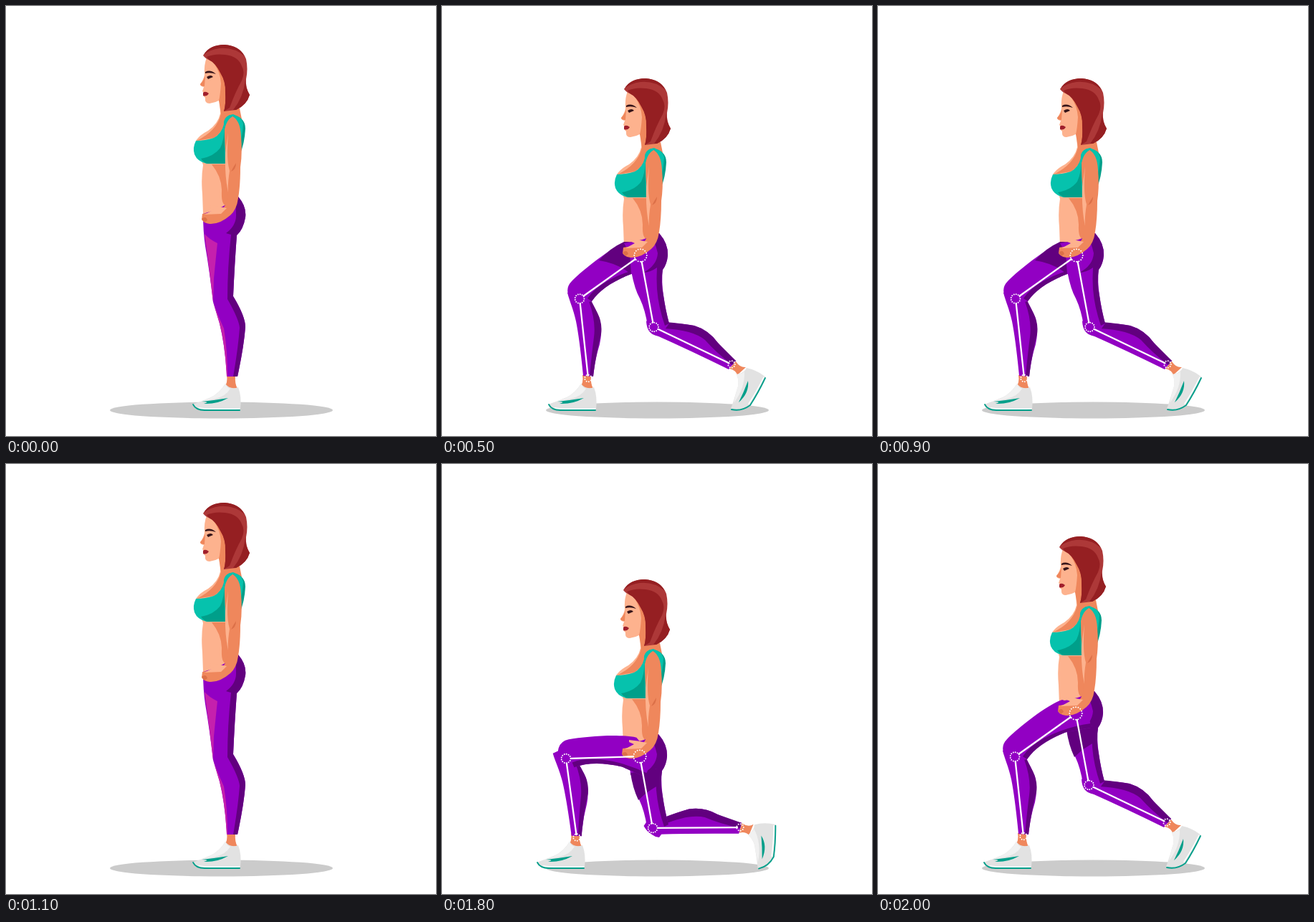
Recreate the animation shown at these times as an HTML page. Size 600 by 600 pixels, loop 2.2 s.

```html
<!DOCTYPE html>
<html lang="en">
<head>
<meta charset="utf-8">
<title>Lunges</title>
<style>
html, body { margin: 0; width: 100%; height: 100%; overflow: hidden; background: #fff }
svg { display: block; width: 600px; height: 600px }
</style>
</head>
<body>
<svg id="stage" viewBox="0 0 600 600"></svg>
<script>
const SKIN = '#fdb28e', TAN = '#ef875c', TAN2 = '#dc7048';
const HAIR = '#ad3838', HAIR2 = '#951f22';
const TEAL = '#06c2ad', TEAL2 = '#009f8a';
const PURPLE = '#9200c3', PLUM = '#62007f', PINK = '#c520ad';

const p = (fill, d) => `<path fill="${fill}" d="${d}"/>`;
const line = (color, width, d) =>
  `<path fill="none" stroke="${color}" stroke-width="${width}" stroke-linecap="round" d="${d}"/>`;
const g = (transform, ...parts) => `<g transform="${transform}">${parts.join('')}</g>`;

const shadow = '<ellipse cx="300.5" cy="564" rx="155.5" ry="11.5" fill="#cbcbcb"/>';

const head =
  p(SKIN, 'M280 72Q276 82 277 96Q276 102 271 109Q271 112 276 113L274 119 277 122 275 125 278 128Q277 136 284 136Q292 135 299 131L308 110 304 78Z') +
  p(TAN, 'M290 80Q299 92 300 108Q299 124 297 132L306 140 309 100Z') +
  p(TAN, 'M278 97Q276 104 271 109Q271 112 277 112Z') +
  p(HAIR, 'M275 69Q284 54 305 54Q328 56 335 74Q338 88 335 102Q334 114 340 124Q336 138 321 145L304 147Q307 138 306 120Q307 106 299 93Q292 79 283 75Q279 74 275 69Z') +
  p(HAIR2, 'M280 71Q291 66 306 68Q324 70 329 84Q334 92 329 104Q320 120 312 142L304 147Q307 138 306 120Q307 106 299 93Q292 79 283 75Z') +
  p(HAIR2, 'M334 103Q334 114 340 124Q336 138 321 145L317 145Q331 128 334 103ZM276 68Q284 54 305 54Q325 55 333 70Q318 57 298 59Q284 61 276 68Z') +
  p('#351419', 'M278 92Q285 88 293 95Q285 92 278 94Z') +
  p('#351419', 'M280 99Q286 95 289 99L282 102Z') +
  p('#a01f2c', 'M275 121Q278 118 283 122Q280 127 275 125Z');

const torso =
  p(SKIN, 'M298 130L299 150Q296 164 282 174Q270 180 265 188L275 222Q272 240 274 262L275 290 310 284 322 268 328 160 325 142Z') +
  p(TAN, 'M297 132L308 132 326 143 329 158 307 160Q303 176 290 184L266 188Q295 174 300 150Z') +
  p(TAN, 'M287 221H309V278Q300 280 301 258Q301 238 287 221Z') +
  p(TEAL, 'M312 152Q303 158 304 165Q301 178 290 184Q278 188 265 188Q260 198 263 207Q267 217 280 220H306L316 160Z') +
  p(TEAL2, 'M304 167Q305 186 299 198Q290 210 272 213Q276 219 282 220H306Z') +
  p(TEAL2, 'M317 152Q334 156 334 171Q333 192 326 208L318 160Z') +
  p(TEAL, 'M317 152Q328 153 331 164Q330 180 327 190L319 159Z') +
  head;

const arm =
  p(TAN, 'M314 153Q327 158 328 182Q330 205 327 225Q327 250 324 268Q322 284 313 292Q298 305 284 304Q276 303 273 298L274 290Q288 288 296 286Q308 284 309 262Q306 245 307 215Q305 195 305 172Q306 156 314 153Z') +
  p(SKIN, 'M283 278Q295 279 308 282L300 290 277 291 290 284 283 281Z') +
  p(SKIN, 'M310 177Q307 214 312 230Q309 249 310 260Q305 238 306 205Z') +
  p(TAN2, 'M321 219Q321 228 314 231Q317 225 321 219ZM273 297Q279 292 281 299L277 302Z') +
  p(TEAL, 'M304 166Q303 153 317 151L321 153Q309 154 305 172Z');

const shoe =
  p(TAN, 'M308 515H320Q319 527 323 534L304 533Q310 526 308 515Z') +
  p('#e2e2e2', 'M306 527Q313 536 324 532Q329 545 327 562L270 563Q261 561 260 556Q274 551 286 546Q298 540 306 527Z') +
  p('#f1f1f1', 'M306 527Q309 533 313 534Q306 545 292 548L268 553Q282 549 288 545Q299 539 306 527Z') +
  line('#fff', 1.5, 'M269 561Q280 563 326 562') +
  line(TEAL2, 1.8, 'M261 556Q265 564 277 564H326') +
  p(TEAL2, 'M273 552Q292 550 310 547Q294 556 276 555Q286 552 273 552Z');

const backShoe =
  p(TAN, 'M401 506L410 496Q416 505 424 504L412 515Q410 508 401 506Z') +
  p('#e2e2e2', 'M411 514Q422 512 425 505Q440 508 452 518Q446 534 430 558Q418 566 403 562Q408 548 411 537Q416 526 411 514Z') +
  p('#f1f1f1', 'M411 514Q419 513 422 510Q423 533 407 554L411 537Q416 526 411 514Z') +
  line('#fff', 1.5, 'M449 518Q438 540 428 555') +
  line(TEAL2, 1.8, 'M451 519Q441 540 430 557Q418 566 404 563') +
  p(TEAL2, 'M427 523Q429 540 414 553Q421 539 427 523Z');

const standing = torso + shoe +
  p(PURPLE, 'M275 290Q304 282 324 266Q336 280 334 295Q331 312 322 320Q319 360 317 405Q334 433 334 448Q332 475 323 517H308Q306 475 298 443L289 413Q284 370 278 335Q275 315 275 290Z') +
  p(PLUM, 'M324 266Q336 280 334 295Q331 312 322 320Q319 360 317 405Q334 433 334 448Q332 475 323 517H317Q324 477 326 449Q325 437 309 409Q309 365 314 319Q310 318 307 317Q322 306 321 290Q321 277 318 270Z') +
  p(PINK, 'M277 318Q283 325 295 331Q293 350 290 380L289 413Q284 370 277 318ZM289 413Q295 430 304 450Q309 480 309 517H308Q306 475 298 443Z') +
  arm;

const shank =
  p(PURPLE, 'M175 400C178 412 183 422 187 440Q192 465 197 516L211 517Q213 495 220 472Q224 455 220 436Q214 422 208 411Q205 392 190 394Z') +
  p(PLUM, 'M208 411C214 425 225 436 222 458Q214 490 211 517L206 516Q209 485 212 462Q215 440 205 412Z');

const backShank =
  p(PURPLE, 'M285 440Q286 458 300 460Q345 480 400 507L410 495Q397 485 385 470Q372 452 352 446Q335 443 314 442Q298 430 285 440Z') +
  p(PLUM, 'M312 441Q335 443 352 446Q372 452 385 470L410 495 405 501Q382 483 367 466Q350 452 310 450Z');

const thigh =
  p(PURPLE, 'M258 329C236 337 198 367 181 384Q173 392 176 402Q181 416 195 415L209 412C220 396 240 383 264 374L298 368 294 340Z') +
  p(PLUM, 'M298 362Q262 367 232 383Q212 394 203 408L209 412C220 396 240 383 264 374L298 368Z');

const thighShade = p(PLUM, 'M254 329Q234 338 219 355Q245 359 262 373L290 362 280 330Z');

const backThigh = p(PURPLE, 'M264 370Q269 396 276 408Q284 425 287 447Q292 460 304 461L317 443Q312 425 309 404Q306 385 308 364Z');

const backThighShade = p(PLUM, 'M264 371L308 364 306 387Q289 395 275 409Q267 392 264 371Z');

const pelvis = p(PURPLE, 'M254 331Q280 328 303 317Q316 332 315 348Q314 360 308 368L264 374 262 345Z');

const sideShade = p(PLUM, 'M303 317Q316 332 315 348Q314 360 308 368Q305 385 309 404Q312 425 317 443L311 446Q302 420 300 395Q299 380 300 365Q290 372 281 372Q300 362 301 345Q297 327 291 321Z');

// White dotted joints joined by bars that stop at the rings
function skeleton([hip, knee, ankle, backKnee, backAnkle]) {
  const ring = ([x, y], r, n) =>
    `<circle cx="${x}" cy="${y}" r="${r}" pathLength="${n}" fill="none" stroke="#fff" stroke-width="2" stroke-linecap="round" stroke-dasharray="0 1"/>`;
  const bar = (a, b, ra, rb) => {
    const dx = b[0] - a[0], dy = b[1] - a[1], len = Math.hypot(dx, dy);
    const at = s => `${a[0] + dx * s} ${a[1] + dy * s}`;
    return line('#fff', 2.3, `M${at(ra / len)}L${at(1 - rb / len)}`);
  };
  return bar(hip, knee, 9, 7) + bar(knee, ankle, 7, 4) +
    bar(hip, backKnee, 9, 7) + bar(backKnee, backAnkle, 7, 4) +
    ring(hip, 8.8, 16) + ring(knee, 6.4, 13) + ring(backKnee, 6.4, 13) +
    ring(ankle, 4.8, 9) + ring(backAnkle, 4.8, 9);
}

function lunge(frontNear, deep) {
  const drop = deep ? 'translate(0 60)' : '';
  const upper = drop + 'translate(-21 47)';
  const front =
    g(deep ? 'translate(-19 3)rotate(-2 193 409)' : '', shank) +
    g(deep ? drop + 'rotate(34 277 349)' : '', thigh, frontNear ? '' : thighShade);
  const back =
    g(deep ? drop + 'rotate(-25.6 295 448)' : '', backShoe, backShank) +
    g(drop, backThigh, pelvis, sideShade, frontNear ? backThighShade : '');
  const joints = deep
    ? [[277, 408], [174, 411], [189, 521], [295, 508], [417, 507]]
    : [[277, 348], [192, 408.5], [204, 519.5], [295.5, 448], [404, 500]];
  return g(`translate(${frontNear ? -1 : 0} 0)`,
    g(upper, torso),
    g(`translate(${deep ? -127 : -112} 0)`, shoe),
    frontNear ? back + front : front + back,
    g(upper, arm),
    skeleton(joints));
}

const stage = document.getElementById('stage');
const poses = [standing, lunge(false, false), lunge(false, true), lunge(true, false), lunge(true, true)];
stage.innerHTML = shadow + poses.map(pose => `<g class="pose">${pose}</g>`).join('');
const layers = stage.querySelectorAll('.pose');

// [end time in ms, pose]
const steps = [[500, 0], [700, 1], [900, 2], [1100, 1], [1600, 0], [1800, 3], [2000, 4], [2200, 3]];
const start = performance.now();

function draw() {
  const t = Math.max(0, performance.now() - start) % 2200;
  const current = steps.find(([end]) => t < end)[1];
  layers.forEach((layer, i) => layer.style.display = i === current ? '' : 'none');
  requestAnimationFrame(draw);
}
draw();
</script>
</body>
</html>
```
